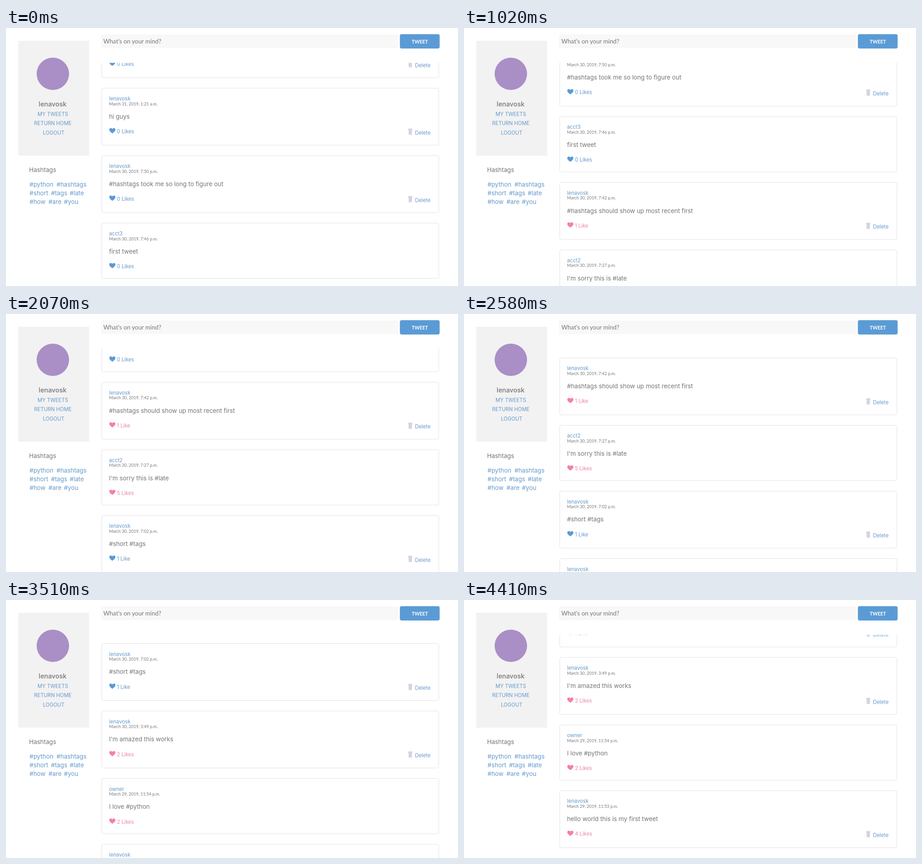
Write an HTML page that moves like this. It is 989 px wide and 566 px high and loops after 4440 ms.

```html
<!DOCTYPE html>
<html lang="en">
<head>
<meta charset="utf-8">
<title>Message feed</title>
<style>
  html, body { margin: 0; width: 100%; height: 100%; overflow: hidden; background: #fff; }
  svg { display: block; font: 13.3px Inter, sans-serif; fill: #757575; }
  .blue { fill: #5b9bd5; }
  .pink { fill: #f57fab; }
  text.blue { fill: #6499cc; }
  text.pink { fill: #ea83ab; }
  .small { font-size: 11.2px; }
  .date { font: 9.2px Lato, sans-serif; }
  .mid { text-anchor: middle; }
  .card { fill: #fff; stroke: #e1e2e5; }
  .bin { fill: #eeeff5; stroke: #b9bdce; stroke-width: .8; }
</style>
</head>
<body>
<svg width="989" height="566" viewBox="0 0 989 566">
  <clipPath id="view"><rect x="200" y="76.4" width="760" height="490"/></clipPath>
  <rect x="27" y="28" width="155" height="252" fill="#f2f2f2"/>
  <circle cx="102.5" cy="100.5" r="35.5" fill="#a98fc6"/>
  <g id="side"></g>
  <rect x="208" y="14" width="650" height="30" fill="#f8f8f8"/>
  <text x="213" y="34" style="font: 13.3px Lato, sans-serif">What's on your mind?</text>
  <rect class="blue" x="861.8" y="13.6" width="87" height="31.4" rx="4"/>
  <text class="mid" x="905.5" y="33.5" fill="#fff" style="font: bold 10.5px Lato, sans-serif">TWEET</text>
  <g clip-path="url(#view)"><g id="feed"></g></g>
</svg>
<script>
const LOOP = 4440, STEP = 30;
const ME = 'lenavosk';

// author, date, message, likes, liked by me
const posts = [
  [ME, '', '', 0, false],
  [ME, 'March 31, 2019, 1:21 a.m.', 'hi guys', 0, false],
  [ME, 'March 30, 2019, 7:50 p.m.', '#hashtags took me so long to figure out', 0, false],
  ['acct3', 'March 30, 2019, 7:46 p.m.', 'first tweet', 0, false],
  [ME, 'March 30, 2019, 7:42 p.m.', '#hashtags should show up most recent first', 1, true],
  ['acct2', 'March 30, 2019, 7:27 p.m.', "I'm sorry this is #late", 5, true],
  [ME, 'March 30, 2019, 7:02 p.m.', '#short #tags', 1, false],
  [ME, 'March 30, 2019, 3:49 p.m.', "I'm amazed this works", 2, true],
  ['owner', 'March 29, 2019, 11:54 p.m.', 'I love #python', 2, true],
  [ME, 'March 29, 2019, 11:53 p.m.', 'hello world this is my first tweet', 4, true]
];

const text = (x, y, str, cls = '') => `<text x="${x}" y="${y}" class="${cls}">${str}</text>`;

const heart = (x, y, cls) =>
  `<path class="${cls}" transform="translate(${x} ${y})" d="M6.7 11.6
   C4.5 9.8 0 7.3 0 3.5C0 -.5 5 -1.2 6.7 2.2C8.4 -1.2 13.4 -.5 13.4 3.5C13.4 7.3 8.9 9.8 6.7 11.6Z"/>`;

const bin = (x, y) =>
  `<path class="bin" transform="translate(${x} ${y})" d="M.4 2.4V.6H8.2V2.4ZM1.1 2.8H7.5L7.2 13H1.4Z
   M3 4V11.8M4.3 4V11.8M5.6 4V11.8"/>`;

function card([author, date, message, likes, liked], top) {
  const own = author === ME, color = liked ? 'pink' : 'blue';
  return `<g transform="translate(0 ${top})">
    <rect class="card" x="209.5" y="0" width="737.5" height="${own ? 125 : 121.3}" rx="3"/>` +
    text(225.5, 27, author, 'blue small') +
    text(225.5, 37.7, date, 'date') +
    text(225.5, 66.9, message) +
    heart(226, 87.6, color) +
    text(242.7, 99, `${likes} Like${likes === 1 ? '' : 's'}`, color + ' small') +
    (own ? bin(880.3, 88.6) + text(895, 101.6, 'Delete', 'blue small') : '') + '</g>';
}

let nextTop = -16;
const feed = document.getElementById('feed');
feed.innerHTML = posts.map(post => {
  const html = card(post, nextTop);
  nextTop += post[0] === ME ? 148 : 144.3;
  return html;
}).join('');

const tagRows = [
  [[51.5, '#python'], [110.5, '#hashtags']],
  [[51.5, '#short'], [98.5, '#tags'], [139.5, '#late']],
  [[51.5, '#how'], [93, '#are'], [126.8, '#you']]
];
document.getElementById('side').innerHTML =
  `<text class="mid" x="102" y="172" font-size="14.3" font-weight="500">${ME}</text>` +
  text(102.5, 192.7, 'MY TWEETS', 'blue small mid') +
  text(102.5, 213.4, 'RETURN HOME', 'blue small mid') +
  text(104.3, 233.9, 'LOGOUT', 'blue small mid') +
  text(50.5, 316.2, 'Hashtags') +
  tagRows.map((row, i) => row.map(([x, tag]) => text(x, 347.6 + i * 19.4, tag, 'blue')).join('')).join('');

// Scroll position over time: [ms, px], joined by a monotone cubic
const path = [[60, 0], [570, 93.5], [1500, 366.6], [2580, 476], [3030, 638.3], [3510, 769], [4350, 886.5]];
const rate = i => (path[i + 1][1] - path[i][1]) / (path[i + 1][0] - path[i][0]);
const slopes = path.map((_, i) => {
  if (i === 0 || i === path.length - 1) return 0;
  const a = rate(i - 1), b = rate(i);
  return 2 * a * b / (a + b);
});

function scrollAt(t) {
  const last = path.length - 1;
  if (t <= path[0][0]) return 0;
  if (t >= path[last][0]) return path[last][1];
  const i = path.findIndex(p => p[0] > t) - 1;
  const [t0, y0] = path[i], [t1, y1] = path[i + 1];
  const d = t1 - t0, u = (t - t0) / d, v = 1 - u;
  return y0 * v * v * (1 + 2 * u) + y1 * u * u * (3 - 2 * u) +
    d * u * v * (slopes[i] * v - slopes[i + 1] * u);
}

function draw() {
  const t = Math.floor(performance.now() % LOOP / STEP) * STEP;
  feed.setAttribute('transform', `translate(0 ${-scrollAt(t).toFixed(2)})`);
  requestAnimationFrame(draw);
}
draw();
</script>
</body>
</html>
```
